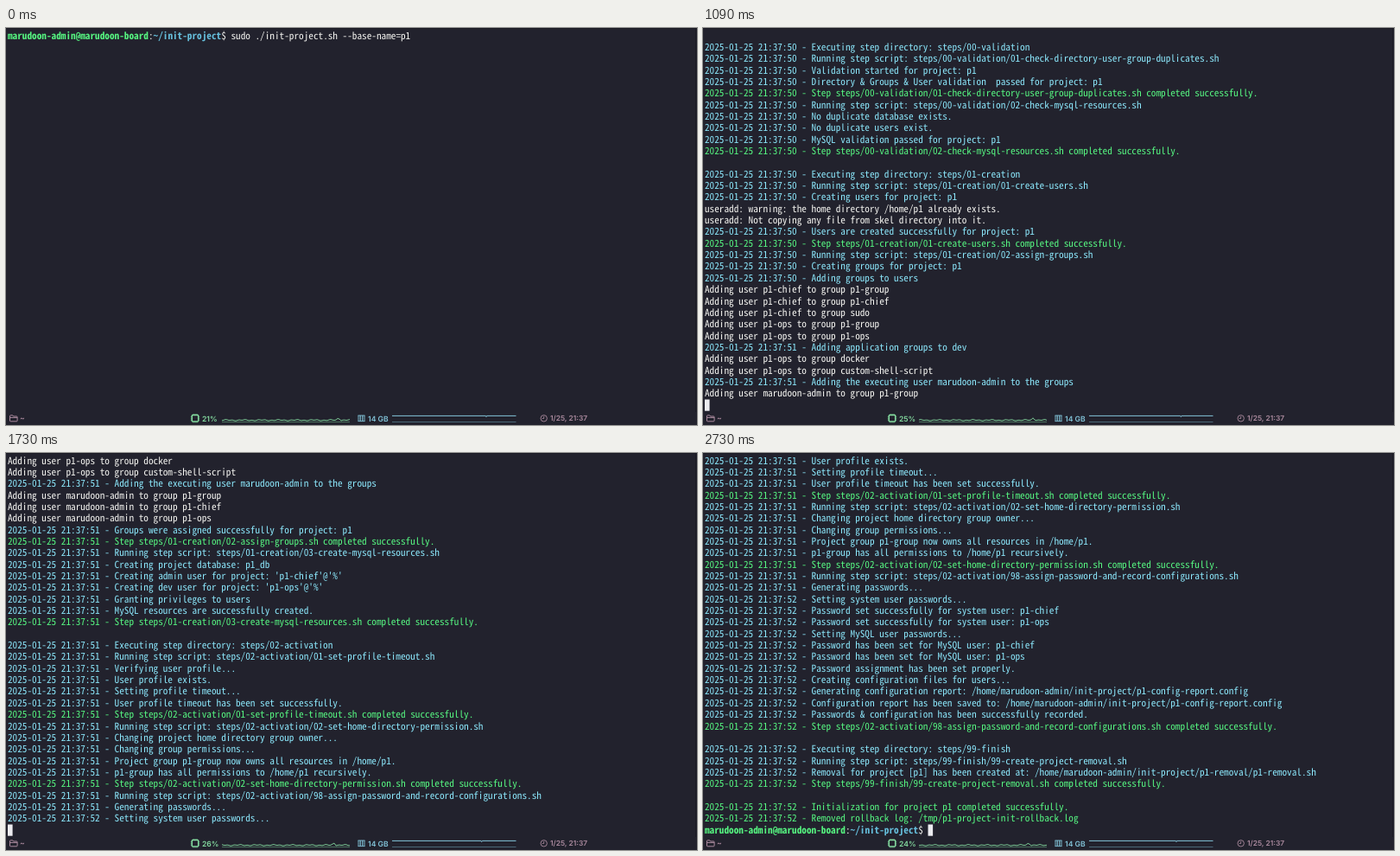
An HTML page that plays this animation: 800x459 px, repeating every 2760 ms.

```html
<!DOCTYPE html>
<html lang="en">
<head>
<meta charset="utf-8">
<title>Project setup in a terminal</title>
<style>
  html, body { margin: 0; width: 100%; height: 100%; overflow: hidden; background: #22222d; }
  svg { display: block; width: 800px; height: 459px; }
  text { white-space: pre; text-rendering: geometricPrecision; }
  #log { font-family: "Noto Sans Mono CJK KR", "Noto Sans Mono CJK JP", "Noto Sans Mono", monospace; fill: #f4f4f0; }
  #log .info { fill: #8be6fa; }
  #log .done { fill: #56f581; }
  #log .host { fill: #56f581; font-weight: 700; }
  #log .path { fill: #66bfdc; font-weight: 700; }
  #bar { font: 600 8.6px Inter, sans-serif; }
  #bar path, #bar rect, #bar circle { fill: none; }
  .cpu { stroke: #84dba0; } text.cpu { fill: #84dba0; stroke: none; }
  .mem { stroke: #82c3d8; } text.mem { fill: #82c3d8; stroke: none; }
  .dim { stroke: #ac8b9f; } text.dim { fill: #ac8b9f; stroke: none; }
</style>
</head>
<body>
<svg viewBox="0 0 800 459">
  <rect width="800" height="459" fill="#22222d"/>
  <rect width="800" height="1" fill="#1b1b25"/>
  <rect x="798" width="1" height="444" fill="#1a1a23"/>
  <g id="log"><rect id="cursor" width="5.6" height="13.2" fill="#ececf0"/></g>
  <g id="bar">
    <path class="dim" d="M4.5 454V448.6q0-.8.8-.8h2.4l1 1.2h3.6q.8 0 .8.8v4.2q0 .8-.8.8h-7q-.8 0-.8-.8ZM4.5 450.4h8.6"/>
    <text class="dim" x="16" y="454.4">~</text>
    <rect class="cpu" x="215.3" y="447.6" width="7.4" height="7.4" rx="1" stroke-width="1.5"/>
    <path class="cpu" stroke-width=".7" d="M217 446v1M219 446v1M221 446v1M217 455.5v1M219 455.5v1M221 455.5v1M213.8 449.4h1M213.8 451.3h1M213.8 453.2h1M223.2 449.4h1M223.2 451.3h1M223.2 453.2h1"/>
    <text class="cpu" id="load" x="227" y="454.5"></text>
    <path class="cpu" d="M250 455.5H398" opacity=".55" stroke-width=".8"/>
    <path class="cpu" id="spark" stroke-width=".9"/>
    <path class="mem" d="M407.5 448h8M407.5 454.6h8M408 448v6.6M415 448v6.6" stroke-width=".9"/>
    <path class="mem" d="M410.2 448v6.6M412.8 448v6.6" stroke-width="1.2"/>
    <text class="mem" x="419" y="454.5">14 GB</text>
    <path class="mem" d="M447 455.5H590.5" opacity=".55" stroke-width=".8"/>
    <path class="mem" id="usage" stroke-width="1"/>
    <circle class="dim" cx="622.7" cy="451.3" r="3.7" stroke-width=".9"/>
    <path class="dim" d="M622.7 448.8v2.7h-2" stroke-width=".8"/>
    <text class="dim" x="630" y="454.4" font-size="8.4">1/25, 21:37</text>
  </g>
</svg>
<script>
const LOOP = 2760, CELL = 5.62, PITCH = 13.34, ROWS = 33;
const USER = 'marudoon-admin', LEAD = 'p1-chief', CODER = 'p1-ops';
const $ = id => document.getElementById(id);

// Leading mark: "=" plain output, "+" success, otherwise an info entry.
const begin = dir => `Executing step directory: steps/${dir}`;
const run = file => `Running step script: steps/${file}.sh`;
const ok = file => `+Step steps/${file}.sh completed successfully.`;
const join = (user, group) => `=Adding user ${user} to group ${group}`;

const lines = [
  '$sudo ./init-project.sh --base-name=p1',
  'Initialization started for project: p1 with rollback log: /tmp/p1-project-init-rollback.log',
  '',
  begin('00-validation'),
  run('00-validation/01-check-directory-user-group-duplicates'),
  'Validation started for project: p1',
  'Directory & Groups & User validation  passed for project: p1',
  ok('00-validation/01-check-directory-user-group-duplicates'),
  run('00-validation/02-check-mysql-resources'),
  'No duplicate database exists.',
  'No duplicate users exist.',
  'MySQL validation passed for project: p1',
  ok('00-validation/02-check-mysql-resources'),
  '',
  begin('01-creation'),
  run('01-creation/01-create-users'),
  'Creating users for project: p1',
  '=useradd: warning: the home directory /home/p1 already exists.',
  '=useradd: Not copying any file from skel directory into it.',
  'Users are created successfully for project: p1',
  ok('01-creation/01-create-users'),
  run('01-creation/02-assign-groups'),
  'Creating groups for project: p1',
  'Adding groups to users',
  join(LEAD, 'p1-group'),
  join(LEAD, LEAD),
  join(LEAD, 'sudo'),
  join(CODER, 'p1-group'),
  join(CODER, CODER),
  'Adding application groups to dev',
  join(CODER, 'docker'),
  join(CODER, 'custom-shell-script'),
  `Adding the executing user ${USER} to the groups`,
  join(USER, 'p1-group'),
  join(USER, LEAD),
  join(USER, CODER),
  'Groups were assigned successfully for project: p1',
  ok('01-creation/02-assign-groups'),
  run('01-creation/03-create-mysql-resources'),
  'Creating project database: p1_db',
  `Creating admin user for project: '${LEAD}'@'%'`,
  `Creating dev user for project: '${CODER}'@'%'`,
  'Granting privileges to users',
  'MySQL resources are successfully created.',
  ok('01-creation/03-create-mysql-resources'),
  '',
  begin('02-activation'),
  run('02-activation/01-set-profile-timeout'),
  'Verifying user profile...',
  'User profile exists.',
  'Setting profile timeout...',
  'User profile timeout has been set successfully.',
  ok('02-activation/01-set-profile-timeout'),
  run('02-activation/02-set-home-directory-permission'),
  'Changing project home directory group owner...',
  'Changing group permissions...',
  'Project group p1-group now owns all resources in /home/p1.',
  'p1-group has all permissions to /home/p1 recursively.',
  ok('02-activation/02-set-home-directory-permission'),
  run('02-activation/98-assign-password-and-record-configurations'),
  'Generating passwords...',
  'Setting system user passwords...',
  `Password set successfully for system user: ${LEAD}`,
  `Password set successfully for system user: ${CODER}`,
  'Setting MySQL user passwords...',
  `Password has been set for MySQL user: ${LEAD}`,
  `Password has been set for MySQL user: ${CODER}`,
  'Password assignment has been set properly.',
  'Creating configuration files for users...',
  `Generating configuration report: /home/${USER}/init-project/p1-config-report.config`,
  `Configuration report has been saved to: /home/${USER}/init-project/p1-config-report.config`,
  'Passwords & configuration has been successfully recorded.',
  ok('02-activation/98-assign-password-and-record-configurations'),
  '',
  begin('99-finish'),
  run('99-finish/99-create-project-removal'),
  `Removal for project [p1] has been created at: /home/${USER}/init-project/p1-removal/p1-removal.sh`,
  ok('99-finish/99-create-project-removal'),
  '',
  '+Initialization for project p1 completed successfully.',
  '+Removed rollback log: /tmp/p1-project-init-rollback.log',
  '$'
];

// [time in ms, line holding the cursor]
const steps = [
  [0, 0], [30, 1], [90, 2], [120, 5], [180, 6], [240, 9], [300, 10], [360, 11],
  [390, 16], [420, 17], [510, 19], [570, 20], [610, 24], [640, 25], [700, 26],
  [760, 27], [820, 28], [880, 29], [920, 31], [980, 32], [1060, 34], [1140, 35],
  [1200, 36], [1260, 39], [1300, 40], [1340, 41], [1380, 42], [1420, 43],
  [1460, 45], [1500, 48], [1540, 50], [1570, 52], [1600, 54], [1630, 56],
  [1660, 58], [1690, 60], [1720, 62], [1820, 63], [1910, 65], [1980, 66],
  [2040, 67], [2090, 69], [2200, 70], [2290, 71], [2350, 73], [2410, 76],
  [2500, 77], [2560, 79], [2620, 80], [2680, 81]
];
const loads = [21, 25, 25, 25, 26, 26, 24];

const log = $('log'), cursor = $('cursor');

// Size the font so that one character fills one cell.
const pen = document.createElement('canvas').getContext('2d');
pen.font = '100px ' + getComputedStyle(log).fontFamily;
log.style.fontSize = CELL * 100 / pen.measureText('0').width + 'px';

function add(parent, tag, cls, content) {
  const el = document.createElementNS('http://www.w3.org/2000/svg', tag);
  if (cls) el.setAttribute('class', cls);
  el.textContent = content;
  return parent.appendChild(el);
}

function makeLine(raw, i) {
  const mark = '$=+'.includes(raw[0]) ? raw[0] : '';
  const body = mark ? raw.slice(1) : raw;
  const second = i < 29 ? 50 : i < 61 ? 51 : 52;
  const stamp = raw && (!mark || mark === '+') ? `2025-01-25 21:37:${second} - ` : '';
  const cls = mark === '+' ? 'done' : mark ? '' : 'info';
  const el = add(log, 'text', cls, mark === '$' ? '' : stamp + body);
  if (mark === '$') {
    add(el, 'tspan', 'host', USER + '@marudoon-board');
    add(el, 'tspan', '', ':');
    add(el, 'tspan', 'path', '~/init-project');
    add(el, 'tspan', '', '$ ' + body);
  }
  el.setAttribute('x', 2);
  el.setAttribute('y', 12.7 + i * PITCH);
  return el;
}
const rows = lines.map(makeLine);

function sparkline(shift) {
  let d = '';
  for (let x = 250; x <= 398; x += 2) {
    const w = x - 385 + shift;
    const wave = Math.sin(w * .83) * .45 + Math.sin(w * .31 + 1) * .4;
    const spike = 3.2 * Math.max(0, 1 - Math.abs(w) / 2.5);
    d += `${d ? 'L' : 'M'}${x} ${(453.4 + wave - spike).toFixed(2)}`;
  }
  return d;
}

let shown = '';
function draw(t) {
  const at = steps.findLast(s => s[0] <= t)[1];
  const tick = Math.floor((t + 390) / 500);
  const blink = t < 30 || (t >= 2090 && t < 2200);
  const key = [at, tick, blink].join();
  if (key === shown) return;
  shown = key;

  const top = Math.max(0, at - ROWS + 1);
  const last = lines.length - 1;
  rows.forEach((el, i) => {
    const on = i >= top && (i < at || i === 0 || (i === last && at === last));
    el.style.display = on ? '' : 'none';
  });
  if (top > 0) rows[0].style.display = 'none';
  log.setAttribute('transform', `translate(0 ${-top * PITCH})`);
  cursor.setAttribute('x', 2 + (at === last ? 46 * CELL : 0));
  cursor.setAttribute('y', 2.6 + at * PITCH);
  cursor.style.display = blink ? 'none' : '';

  const shift = tick * 4 / 3;
  $('load').textContent = loads[tick] + '%';
  $('spark').setAttribute('d', sparkline(shift));
  const x = 556 - shift;
  $('usage').setAttribute('d', `M447 448.4H${x - .6}l.6 1.2 .6-1.2H590.5`);
}

const start = performance.now();
function frame() {
  draw((performance.now() - start) % LOOP);
  requestAnimationFrame(frame);
}
frame();
</script>
</body>
</html>
```
